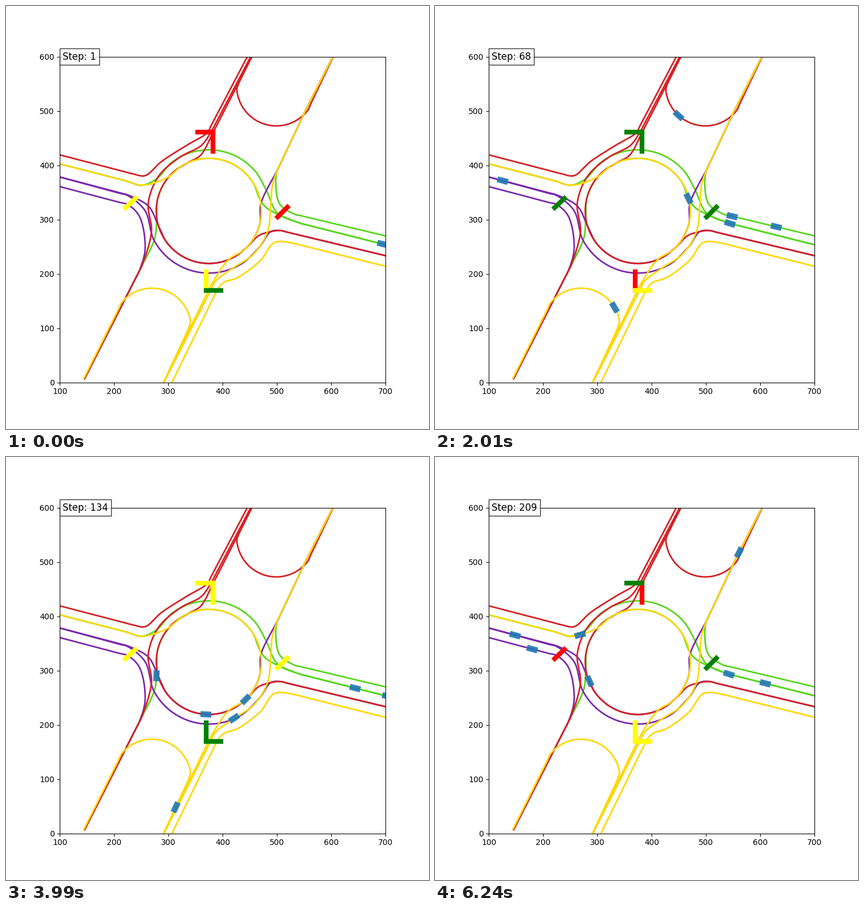
Recreate the animation shown at these times as a matplotlib script. Size 748 by 748 pixels, loop 6.27 s.

```python
import numpy as np
import matplotlib.pyplot as plt
from matplotlib.animation import FuncAnimation
from matplotlib.patches import Rectangle

FRAMES, INTERVAL = 209, 30
CAR_L, CAR_W = 20, 11
PHASE = 60                                   # steps per signal colour
PHASES = ("green", "yellow", "red")
SPEED = {"green": 4.64, "yellow": 3.25, "red": 1.85}   # units per step
GREEN, PURPLE, RED, GOLD = "#58d61c", "#7a28ac", "#d62024", "#ffd700"
HUB, INNER, OUTER = (358.7, 362.3), 93, 108


def to_data(pts):
    """Layout pixels (y down) to axes units."""
    p = np.asarray(pts, float)
    return np.column_stack([p[:, 0] / 0.96 + 0.66, 693.46 - p[:, 1] / 0.96])


def ring(a0, a1, r=INNER, hub=HUB):
    """Counter-clockwise arc, angles in degrees."""
    a = np.radians(np.linspace(a0, a1, max(3, int(a1 - a0) // 18)))
    return list(zip(hub[0] + r * np.cos(a), hub[1] - r * np.sin(a)))


def smooth(pts, n=14):
    """Spline through the points; long runs stay straight."""
    p = [np.array(pts[0], float)]
    for q in np.array(pts[1:], float):
        d = q - p[-1]
        size = np.hypot(*d)
        if size > 75:
            u = d / size * 15
            p += [p[-1] + u, q - u]
        p.append(q)
    p = np.array(p)
    h = np.sqrt(np.hypot(*np.diff(p, axis=0).T))[:, None]
    d = np.diff(p, axis=0) / h
    m = np.vstack([d[:1], (d[:-1] * h[1:] + d[1:] * h[:-1]) / (h[1:] + h[:-1]), d[-1:]])
    t = np.linspace(0, 1, n, endpoint=False)[:, None]
    out = []
    for i in range(len(h)):
        out.append((2 * t**3 - 3 * t**2 + 1) * p[i] + (3 * t**2 - 2 * t**3) * p[i + 1]
                   + h[i] * ((t**3 - 2 * t**2 + t) * m[i] + (t**3 - t**2) * m[i + 1]))
    return np.vstack(out + [p[-1:]])


def signal(start, step):
    return PHASES[(step - start) // PHASE % len(PHASES)]


class Route:
    def __init__(self, color, *pts):
        self.color = color
        self.xy = to_data(smooth(pts))
        self.s = np.r_[0, np.cumsum(np.hypot(*np.diff(self.xy, axis=0).T))]
        self.stop = np.hypot(*np.diff(to_data(pts[:2]), axis=0)[0])

    def at(self, s):
        return np.array([np.interp(s, self.s, c) for c in self.xy.T])


class Car:
    """Enters at one step, slows on approach to a signal that is not green."""

    def __init__(self, name, enter, leave=FRAMES + 1):
        self.route, self.enter, self.leave = routes[name], enter, leave
        start, s = approach.get(name[0]), 0
        self.s = [s]
        for step in range(enter, FRAMES):
            held = start is not None and s < self.route.stop
            s += SPEED[signal(start, step) if held else "green"]
            self.s.append(s)
        self.patch = Rectangle((0, 0), CAR_L, CAR_W, rotation_point="center",
                               fc="#1f77b4", alpha=0.9, lw=0, zorder=4)

    def update(self, step):
        r = self.route
        shown = self.enter <= step < self.leave and self.s[step - self.enter] <= r.s[-1]
        self.patch.set_visible(bool(shown))
        if shown:
            s = self.s[step - self.enter]
            x, y = r.at(s)
            dx, dy = r.at(s + 5) - r.at(s - 5)
            self.patch.set_xy((x - CAR_L / 2, y - CAR_W / 2))
            self.patch.set_angle(np.degrees(np.arctan2(dy, dx)))


# shared exits
NORTH = [(480, 290), (527, 190), (588, 70)]
EAST = [(468, 399), (485, 397), (690, 446)]
SOUTH = [(240, 460), (139, 659)]
WEST = [(240, 317), (215, 310), (75, 274)]

# named by entry and exit arm
routes = {
    "EN": Route(GREEN, (690, 411), (510, 368), (484, 350), (477, 312), *NORTH),
    "EW": Route(GREEN, (690, 427), (520, 384), (480, 366), *ring(20, 148, OUTER), *WEST),
    "ES": Route(GREEN, (690, 427), (520, 384), (462, 358), *ring(12, 188), (263, 411), *SOUTH),
    "WS": Route(PURPLE, (75, 314), (215, 351), (236, 372), (246, 430), (235, 470), (139, 659)),
    "WE": Route(PURPLE, (75, 297), (215, 335), (246, 362), *ring(208, 325, OUTER + 2), *EAST),
    "WN": Route(PURPLE, (75, 297), (215, 334), (252, 354), *ring(196, 368), *NORTH),
    "NW": Route(RED, (437, 70), (356, 224), (320, 246), (275, 275), (246, 300),
                (225, 297), (75, 258)),
    "NS": Route(RED, (443, 70), (362, 224), (345, 247), *ring(118, 200, OUTER), *SOUTH),
    "NE": Route(RED, (445, 70), (366, 224), (344, 264), *ring(114, 316), (447, 406), *EAST),
    "NN": Route(RED, (444, 70), (411, 138), *ring(185, 322, 70, (478, 142)), (588, 70)),
    "SE": Route(GOLD, (285, 683), (374, 501), (385, 489), (410, 480), (450, 450),
                (475, 418), (510, 420), (690, 465)),
    "SN": Route(GOLD, (270, 684), (370, 487), *ring(292, 365, OUTER + 2), (471, 318), *NORTH),
    "SW": Route(GOLD, (270, 684), (362, 495), *ring(292, 478), (284, 304), *WEST),
    "SS": Route(GOLD, (270, 684), (322, 572), *ring(10, 140, 69, (258, 568)), (138, 658)),
}

# signals that hold back arriving cars: step at which green starts
approach = {"E": 24, "W": 66}

# signal bars: xs, ys, start of green
signals = [
    ((382, 382), (461, 426), 58),
    ((354, 382), (461, 461), 27),
    ((221, 239), (322, 339), approach["W"]),
    ((501, 519), (305, 323), approach["E"]),
    ((369.5, 369.5), (204, 170), 101),
    ((369.5, 396), (170, 170), 133),
]

cars = [Car(*c) for c in [
    ("ES", -13), ("EW", 29, 70), ("EN", 30, 70), ("EN", 48, 72),
    ("EW", 110, 167), ("EW", 129), ("EW", 155),
    ("WN", 45, 167), ("WN", 80, 134), ("WS", 92, 134),
    ("WN", 141), ("WS", 167), ("WE", 177),
    ("NN", 37), ("SS", 31), ("SW", 66), ("SN", 75),
    ("SS", 118, 167), ("SS", 134, 167),
]]

fig, ax = plt.subplots(figsize=(7.48, 7.48), dpi=100)
ax.set_xlim(100, 700)
ax.set_ylim(0, 600)
ax.set_aspect("equal")

for r in routes.values():
    ax.plot(*r.xy.T, color=r.color, lw=2)
bars = [ax.plot(x, y, lw=6, zorder=3)[0] for x, y, _ in signals]
for car in cars:
    ax.add_patch(car.patch)
label = ax.text(105, 595, "", fontsize=12, zorder=5,
                bbox=dict(facecolor="white", alpha=0.8))


def draw(i):
    step = i + 1
    label.set_text(f"Step: {step}")
    for bar, (_, _, start) in zip(bars, signals):
        bar.set_color(signal(start, step))
    for car in cars:
        car.update(step)
    return [label, *bars, *(c.patch for c in cars)]


anim = FuncAnimation(fig, draw, frames=FRAMES, interval=INTERVAL, repeat=True)
plt.show()
```
